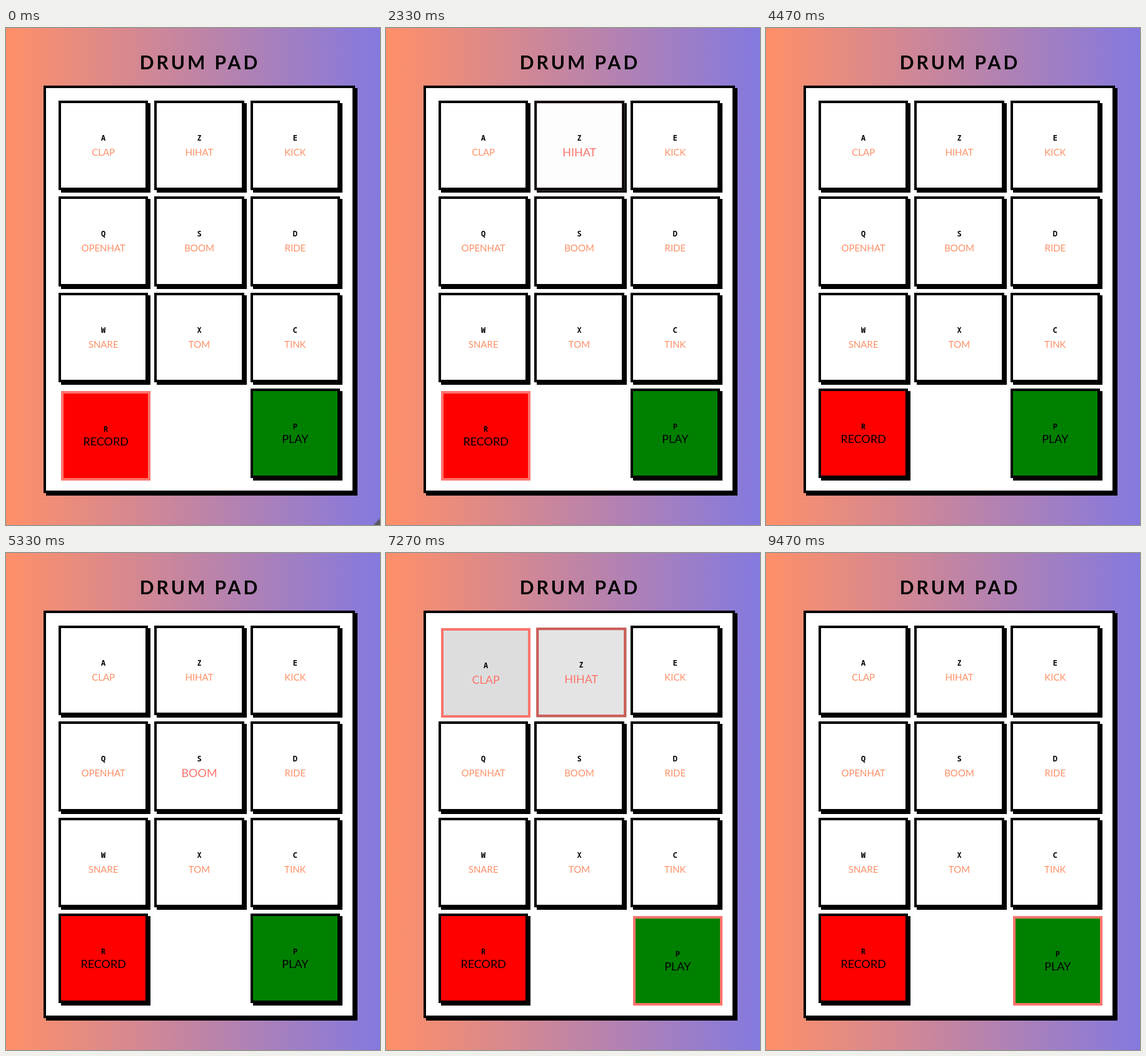
Recreate the animation shown at these times as an HTML page. Size 598 px wide and 794 px high, loop 9940 ms.

```html
<!DOCTYPE html>
<html lang="en">
<head>
<meta charset="utf-8">
<title>Drum Pad</title>
<style>
  * { box-sizing: border-box; }
  html, body { margin: 0; width: 100%; height: 100%; overflow: hidden; }
  body {
    position: relative;
    background: linear-gradient(to right, #ff9068, #8479df);
    font-family: Lato, "Open Sans", sans-serif;
  }
  h1 {
    position: absolute; left: 60px; top: 34px; width: 500px; margin: 0;
    font-size: 30px; line-height: 40px; font-weight: 700;
    letter-spacing: 4px; text-align: center; color: #000;
  }
  #panel {
    position: absolute; left: 60px; top: 92px; width: 498px; height: 651.33px;
    background: #fff; border: 4px solid #000; box-shadow: 4px 4px 0 #000;
  }
  .pad {
    position: absolute; width: 143.33px; height: 143.33px;
    border: 4px solid #000; text-align: center;
  }
  .pad b, .pad span { position: absolute; left: 0; right: 0; }
  .pad b {
    top: 48px; color: #000;
    font: 700 12px/16px "Noto Sans Mono", "DejaVu Sans Mono", monospace;
  }
  .pad span { top: 68px; line-height: 20px; white-space: nowrap; }
  .tool b { top: 49px; }
  .tool span { top: 66px; }
  #corner {
    position: absolute; right: 0; bottom: 0; width: 14px; height: 14px;
    background: linear-gradient(135deg, transparent 55%, #555 72%);
  }
  #popup {
    position: absolute; left: 360px; top: 702px; width: 203px; height: 110px;
    border-radius: 7px 7px 0 0; background: rgba(43, 42, 43, .96);
    box-shadow: 0 0 7px rgba(0, 0, 0, .4); color: #fff;
  }
  #popup i { position: absolute; }
  #popup .title {
    position: absolute; left: 32px; top: 10px; white-space: nowrap;
    font: 400 11.5px/18px "Open Sans", "Noto Sans", sans-serif;
  }
  #shot { position: absolute; left: 9px; top: 38px; width: 186px; height: 80px; background: #191a1c; }
  #shot span {
    position: absolute; white-space: nowrap; color: #b8b8b8;
    font: 400 3.6px/5px "Open Sans", sans-serif;
  }
</style>
</head>
<body>
<h1>DRUM PAD</h1>
<div id="panel"></div>
<div id="corner"></div>
<div id="popup">
  <i style="left:8px;top:11px;width:16px;height:16px;border-radius:50%;background:#e23b3f"></i>
  <div class="title">ShareX 17.0</div>
  <div id="shot"></div>
</div>
<script>
const LOOP = 9940, STEP = 200 / 3;
const TAP = 117, FADE = 100;
const $ = id => document.getElementById(id);

// key, label, then press times: a start, or [start, release]
const PADS = [
  ['A', 'CLAP', [1196, 1665, 4262, 6796, [7130, 8790]]],
  ['Z', 'HIHAT', [1430, 2327, 2660, 4596, 7217, 7860, 8330, 8930]],
  ['E', 'KICK', [4929]],
  ['Q', 'OPENHAT', []],
  ['S', 'BOOM', [3062, 5332, 7530, 8150, 8483, 9196]],
  ['D', 'RIDE', []],
  ['W', 'SNARE', []],
  ['X', 'TOM', []],
  ['C', 'TINK', []],
  ['R', 'RECORD', [[-1000, 3862]], '#f00'],
  null,
  ['P', 'PLAY', [[5925, LOOP]], '#008000']
];

const clamp = x => Math.min(1, Math.max(0, x));
const mix = (a, b, p) => a + (b - a) * p;

// cubic-bezier(.25, .1, .25, 1)
function ease(x) {
  x = clamp(x);
  let lo = 0, hi = 1;
  for (let i = 0; i < 20; i++) {
    const s = (lo + hi) / 2, r = 1 - s;
    if (.75 * r * r * s + .75 * r * s * s + s * s * s < x) lo = s; else hi = s;
  }
  const s = lo, r = 1 - s;
  return .3 * r * r * s + 3 * r * s * s + s * s * s;
}

function add(parent, tag, text, css) {
  const el = document.createElement(tag);
  el.textContent = text;
  el.style.cssText = css || '';
  parent.appendChild(el);
  return el;
}

const pads = PADS.map((row, i) => {
  if (!row) return null;
  const [key, label, taps, fill] = row;
  const x = 84 + (i % 3) * 460 / 3, y = 116 + Math.floor(i / 3) * 460 / 3;
  const el = add(document.body, 'div', '', `left:${x}px;top:${y}px`);
  el.className = fill ? 'pad tool' : 'pad';
  add(el, 'b', key);
  const name = add(el, 'span', label);
  const presses = taps.map(t => Array.isArray(t) ? t : [t, t + TAP]);
  return { el, name, fill, presses, fade: fill ? 200 : FADE };
}).filter(Boolean);
document.body.append($('popup'));

function drawPad(pad, t) {
  let p = 0, on = false;
  for (const [start, end] of pad.presses) {
    if (t < start) continue;
    on = on || t < end;
    p = Math.max(p, t < end ? ease((t - start) / pad.fade) : 1 - ease((t - end) / pad.fade));
  }
  const grey = mix(255, 221, p), s = pad.el.style;
  s.transform = p > 0 ? `translate(${4 * p}px,${4 * p}px)` : 'none';
  s.background = pad.fill || `rgb(${grey},${grey},${grey})`;
  s.borderColor = `rgb(${253 * p},${116 * p},${108 * p})`;
  s.boxShadow = `${4 * (1 - p)}px ${4 * (1 - p)}px 0 rgba(0,0,0,${1 - p})`;
  pad.name.style.fontSize = pad.fill || on ? '18px' : '15px';
  pad.name.style.color = pad.fill ? '#000' : on ? '#fd746c' : '#ff9068';
}

// small window preview inside the popup
function buildShot() {
  const shot = $('shot');
  const box = (x, y, w, h, bg) =>
    add(shot, 'i', '', `left:${x}px;top:${y}px;width:${w}px;height:${h}px;background:${bg}`);
  const note = (x, y, text) => add(shot, 'span', text, `left:${x}px;top:${y}px`);
  box(0, 0, 186, 6, '#202124');
  box(2, 2, 3, 3, '#d33');
  note(7, .5, 'Main window');
  note(172, .5, '–  □  ×');
  ['Capture', 'Upload file', 'Workflows', 'Tools', 'After capture tasks', 'After upload tasks',
    'Task settings', 'Hotkey settings'].forEach((text, i) => {
    const y = 8 + i * 5.5 + (i > 3 ? 1 : 0);
    box(1.5, y + 1, 3, 3, ['#6aa0c8', '#4a90c0', '#58a868', '#d44'][i % 4]);
    note(6, y, text);
    if (i !== 3) note(47, y, '▸');
  });
  ['Screen_01.png', 'Screen_02.png', 'Screen_03.png'].forEach((text, i) => note(55 + i * 32, 8, text));
  box(60, 14, 18, 23, 'linear-gradient(#4c7fae, #b9c6c8 45%, #1c3047 60%, #30577c)');
  box(95, 14, 12, 23, '#242628');
  for (let i = 0; i < 7; i++) box(97, 16 + i * 3, 4 + (i * 5) % 6, 1, '#555');
  box(125, 14, 17, 23, '#2b405b');
  for (let i = 0; i < 4; i++) box(126 + (i % 2) * 8, 16 + (i >> 1) * 11, 7, 7, i % 3 ? '#3f7f8d' : '#b63936');
}

function draw(now) {
  const t = Math.floor((now % LOOP + 4) / STEP) * STEP;
  for (const pad of pads) drawPad(pad, t);
  $('corner').style.opacity = t < 60 ? 1 : t < 130 || (t > 530 && t < 595) ? .4 : 0;
  const show = Math.min(clamp((t - 8250) / 150), clamp((8730 - t) / 120));
  $('popup').style.opacity = show;
  $('popup').style.transform = `translateY(${8 * (1 - show)}px)`;
}

buildShot();
const begin = performance.now();
function tick() {
  draw(performance.now() - begin);
  requestAnimationFrame(tick);
}
tick();
</script>
</body>
</html>
```
